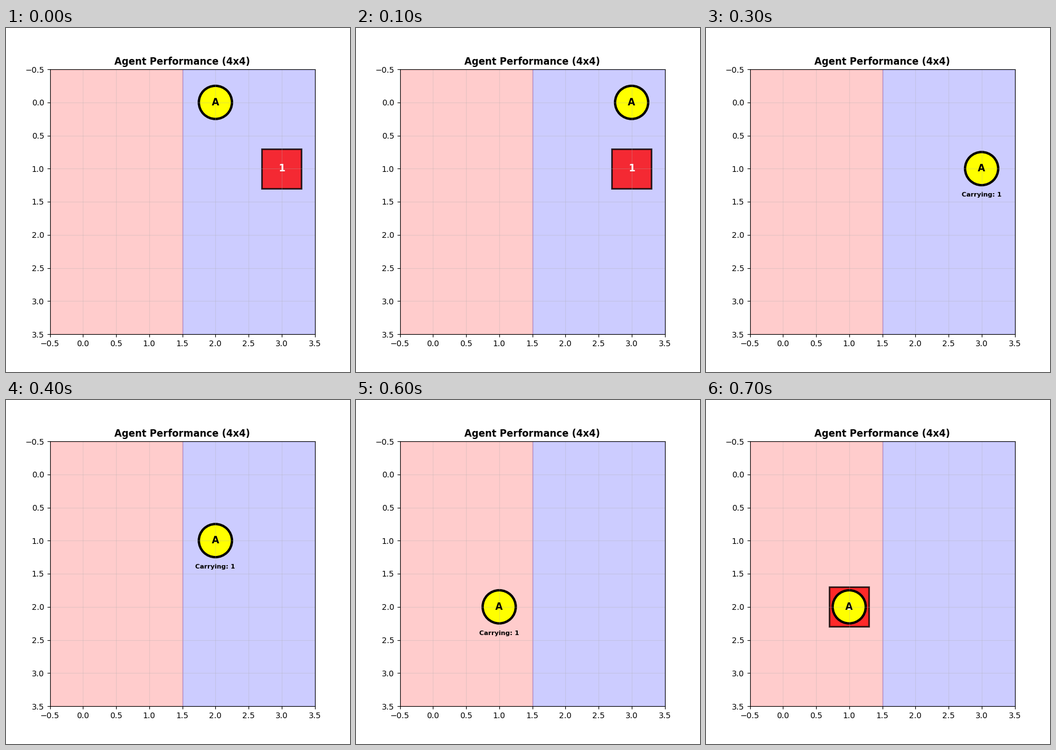
A matplotlib script for the animation above (0.8 s loop, 600 by 600 pixels).

```python
import matplotlib.pyplot as plt
from matplotlib.animation import FuncAnimation
from matplotlib.patches import Circle, Rectangle

SIZE = 4
STEP_MS = 100
BOX_SIDE = 0.6
PICKUP, DROP = 3, 7
PATH = [(2, 0), (3, 0), (3, 1), (3, 1), (2, 1), (1, 1), (1, 2), (1, 2)]

plt.rcParams["font.family"] = "DejaVu Sans"
fig, ax = plt.subplots(figsize=(6, 6), dpi=100)
ax.set_xlim(-0.5, SIZE - 0.5)
ax.set_ylim(SIZE - 0.5, -0.5)
ax.set_aspect("equal")
ax.grid(True, alpha=0.3)
ax.set_title(f"Agent Performance ({SIZE}x{SIZE})", fontsize=12, fontweight="bold")

middle = SIZE / 2 - 0.5
ax.axvspan(-0.5, middle, alpha=0.2, color="red")
ax.axvspan(middle, SIZE - 0.5, alpha=0.2, color="blue")


def label(text, size, color="black"):
    return ax.text(0, 0, text, ha="center", va="center",
                   fontsize=size, fontweight="bold", color=color)


box = ax.add_patch(Rectangle((0, 0), BOX_SIDE, BOX_SIDE, facecolor="red",
                             edgecolor="black", linewidth=2, alpha=0.8))
agent = ax.add_patch(Circle((0, 0), 0.25, facecolor="yellow",
                            edgecolor="black", linewidth=3))
box_label = label("1", 12, "white")
agent_label = label("A", 12)
carry_label = label("Carrying: 1", 8)


def update(step):
    x, y = PATH[step]
    agent.center = (x, y)
    agent_label.set_position((x, y))
    carry_label.set_position((x, y + 0.4))

    carrying = PICKUP <= step < DROP
    box_x, box_y = PATH[PICKUP] if step < PICKUP else PATH[DROP]
    box.set_xy((box_x - BOX_SIDE / 2, box_y - BOX_SIDE / 2))
    box_label.set_position((box_x, box_y))

    carry_label.set_visible(carrying)
    box.set_visible(not carrying)
    box_label.set_visible(not carrying)
    return box, agent, box_label, agent_label, carry_label


anim = FuncAnimation(fig, update, frames=len(PATH), interval=STEP_MS,
                     repeat=True, repeat_delay=0, blit=False)
plt.show()
```
